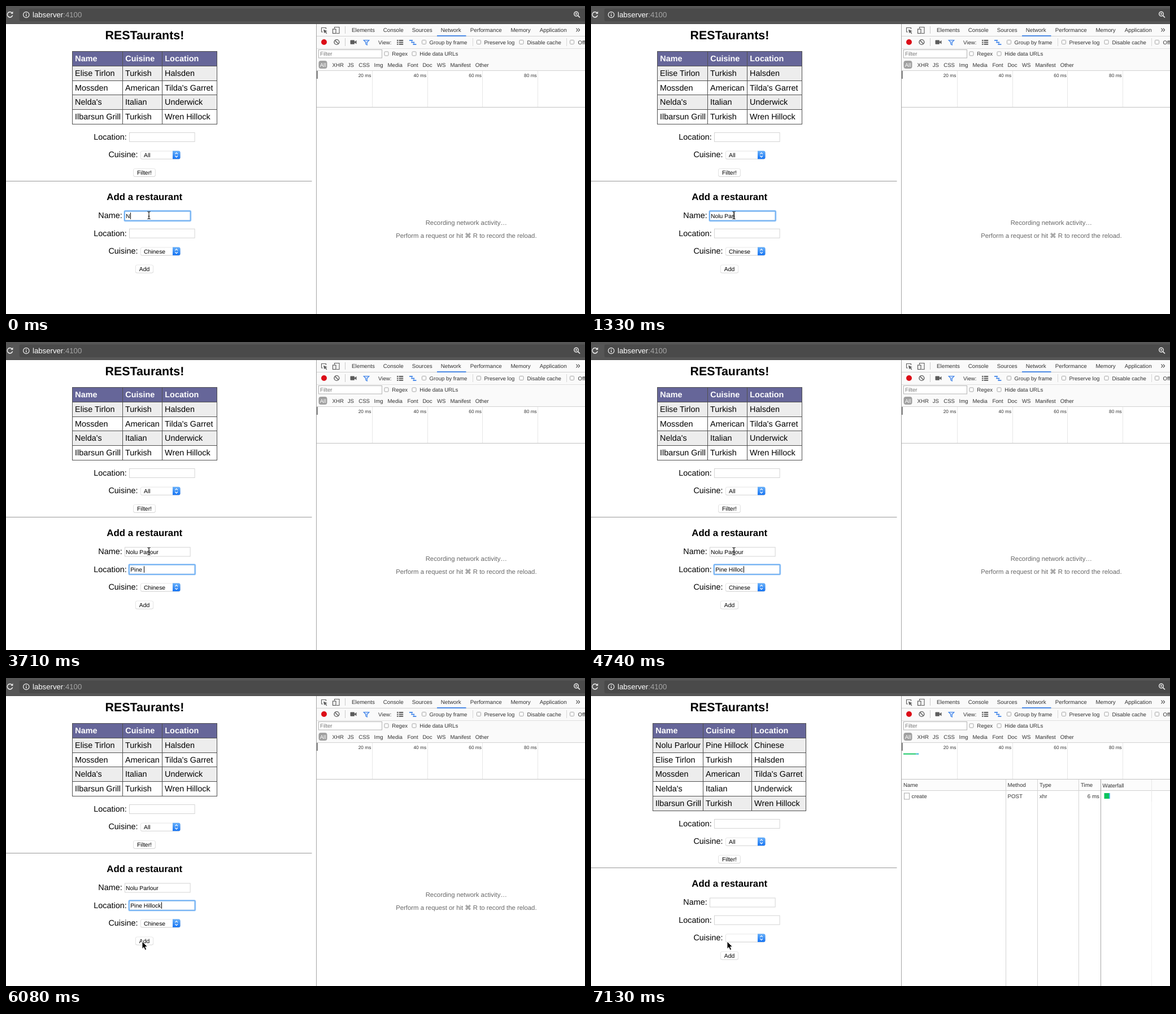
These frames come from a looping animation (1025 by 546 pixels, 8000 ms). An HTML page:

```html
<!DOCTYPE html>
<html lang="en">
<head>
<meta charset="utf-8">
<title>Restaurant form</title>
<style>
  html, body { margin: 0; width: 100%; height: 100%; overflow: hidden; background: #fff; }
  svg { display: block; width: 100vw; height: 100vh; }
  text { font-family: "Liberation Sans", Arial, "DejaVu Sans", sans-serif; white-space: pre; text-rendering: geometricPrecision; }
</style>
</head>
<body>
<svg id="stage" viewBox="0 0 1025 546" xmlns="http://www.w3.org/2000/svg"></svg>
<script>
const LOOP = 8000;
const SENT = 7130;
const BLUR = 6980;
const TAB = 2220;
const NAME = "Nolu Parlour";
const PLACE = "Pine Hillock";

// Time at which each character appears.
const nameKeys = [0, 300, 450, 600, 740, 890, 1180, 1330, 1480, 1480, 1620, 1920];
const placeKeys = [2970, 3270, 3410, 3410, 3710, 4000, 4150, 4300, 4450, 4590, 4740, 4890];
const caretOff = [[2670, 2970], [5480, 5930], [6380, 6830]];

// Pointer: time, x, y.
const path = [
  [0, 253, 371], [5190, 255, 388], [5340, 259, 430], [5480, 260, 453], [5630, 258, 459],
  [5780, 251, 463], [5930, 244, 466], [6080, 241, 467]
];

const text = (x, y, size, str, opt = "") => `<text x="${x}" y="${y}" font-size="${size}" ${opt}>${str}</text>`;
const rect = (x, y, w, h, fill, opt = "") => `<rect x="${x}" y="${y}" width="${w}" height="${h}" fill="${fill}" ${opt}/>`;
const line = (x1, y1, x2, y2, color, w = 1) =>
  `<line x1="${x1}" y1="${y1}" x2="${x2}" y2="${y2}" stroke="${color}" stroke-width="${w}"/>`;
const draw = (d, color, w = 1.2, fill = "none") => `<path d="${d}" stroke="${color}" stroke-width="${w}" fill="${fill}"/>`;
const group = (id, body) => `<g id="${id}">${body}</g>`;
const MID = 'text-anchor="middle"';
const BOLD = 'font-weight="bold"';

function addressBar() {
  return rect(0, 0, 1025, 32, "#565656")
    + rect(23.5, 4.5, 1010, 22.5, "#4a4a4a", 'rx="3"')
    + line(0, 31.5, 1025, 31.5, "#474747")
    + draw("M10.6 12.2A4.7 4.7 0 1 0 11.6 16.4", "#f0f0f0", 1.5)
    + draw("M12.4 9.6V13.8H8.2Z", "none", 0, "#f0f0f0")
    + `<circle cx="35.8" cy="15.5" r="5.2" fill="none" stroke="#f0f0f0" stroke-width="1.2"/>`
    + rect(35.1, 14.8, 1.4, 3.6, "#f0f0f0") + rect(35.1, 12.3, 1.4, 1.4, "#f0f0f0")
    + text(47, 20, 13.2, 'labserver<tspan fill="#a6a6a6">:4100</tspan>', 'fill="#fff"')
    + `<circle cx="1009.5" cy="14" r="3.8" fill="none" stroke="#eee" stroke-width="1.4"/>`
    + draw("M1012.3 16.8L1016 20.5", "#eee", 1.7)
    + draw("M1007.6 14H1011.4M1009.5 12.1V15.9", "#eee", 1);
}

function table(id, cols, rows) {
  const left = cols[0], width = cols[3] - left;
  const edge = r => Math.floor(80.5 + 25.8 * r) + 0.5;
  const bottom = edge(rows.length + 1);
  let out = rect(left, edge(0), width, 26, "#666699");
  ["Name", "Cuisine", "Location"].forEach((s, i) => {
    out += text(cols[i] + 4.8, 98, 14.4, s, BOLD + ' fill="#fff"');
  });
  rows.forEach((row, i) => {
    const y = edge(i + 1);
    out += rect(left, y, width, edge(i + 2) - y, i % 2 ? "#fff" : "#ededed");
    row.forEach((s, c) => { out += text(cols[c] + 4.6, y + 17.4, 14.4, s); });
  });
  for (let r = 0; r <= rows.length + 1; r++) {
    out += line(left - 0.5, edge(r), cols[3] + 0.5, edge(r), "#505050");
  }
  cols.forEach(x => { out += line(x, edge(0), x, bottom, "#505050"); });
  return group(id, out);
}

const field = (x, y) => rect(x + 0.5, y + 0.5, 115.6, 16, "#fff", 'stroke="#d4d4d4"');

const ring = (id, x, y) => group(id,
  rect(x - 0.4, y - 0.3, 117.4, 17.8, "none", 'rx="1.8" stroke="#a9d0fb" stroke-width="2.8" opacity=".75"')
  + rect(x, y, 116.6, 17.2, "none", 'rx="1" stroke="#6fb0f3" stroke-width="1.8"'));

const control = (x, y, w) => rect(x, y + 0.8, w, 14.2, "#c8c8c8", 'rx="3"')
  + rect(x + 0.4, y + 0.4, w - 0.8, 13.9, "#fff", 'rx="2.8" stroke="#e4e4e4" stroke-width=".8"');

function select(y, label, id) {
  return control(238, y, 70.5)
    + `<path d="M295 ${y}H305.5Q308.5 ${y} 308.5 ${y + 3}V${y + 11.5}Q308.5 ${y + 14.5} 305.5 ${y + 14.5}H295Z" fill="url(#blue)"/>`
    + draw(`M299.4 ${y + 5.8}L301.7 ${y + 3.3}L304 ${y + 5.8}M299.4 ${y + 8.7}L301.7 ${y + 11.2}L304 ${y + 8.7}`, "#fff", 1.2)
    + text(244, y + 11.2, 10.4, label, `id="${id}"`);
}

const button = (x, y, w, label) => control(x, y, w) + text(x + w / 2, y + 11.2, 10.4, label, MID);

function forms() {
  return text(155.3, 237, 14.4, "Location:") + field(218, 224)
    + text(181.4, 268, 14.4, "Cuisine:") + select(256.8, "All", "anyKind")
    + button(225.3, 287.8, 39.4, "Filter!")
    + line(0, 310.5, 541.5, 310.5, "#989898")
    + text(245.2, 344, 16.85, "Add a restaurant", BOLD + " " + MID)
    + text(163.3, 376.4, 14.4, "Name:") + field(210, 363.5) + ring("nameRing", 210, 363.5)
    + text(212, 376, 10.4, "", 'id="nameText"')
    + text(155.3, 407.6, 14.4, "Location:") + field(218, 394.7) + ring("placeRing", 218, 394.7)
    + text(220.2, 407.3, 10.4, "", 'id="placeText"')
    + text(181.4, 438.8, 14.4, "Cuisine:") + select(427.5, "Chinese", "kind")
    + button(229, 458.6, 32, "Add")
    + rect(0, 0, 1, 11.5, "#000", 'id="caret"');
}

const check = (x, y) => rect(x + 0.5, y + 0.5, 7, 7, "#fdfdfd", 'rx="1.2" stroke="#a4a4a4"');

function devtools() {
  const ink = "#333", icon = "#5c5c5c", blue = "#4285e8", bar = "#fafafa";
  const labels = (items, y, size) => items.map(([x, s]) => text(x, y, size, s, `fill="${ink}"`)).join("");
  let out = rect(549, 32, 476, 514, "#fff") + rect(550, 32, 475, 82, bar)
    + line(550, 53.5, 1025, 53.5, "#d2d2d2") + line(550, 75.5, 1025, 75.5, "#e0e0e0")
    + line(550, 114.5, 1025, 114.5, "#d2d2d2");

  // Tabs
  out += draw("M566.5 41V38.5H558.5V46H561", icon, 1.1)
    + draw("M562 41.5L568.8 44.6L566 45.5L568.4 48.2L567.2 49.2L564.8 46.5L563.4 48.6Z", "none", 0, icon)
    + draw("M581.5 40V37.5H590V48.5H585", icon, 1.1)
    + rect(578.5, 41, 5.5, 7.5, bar, `stroke="${icon}" stroke-width="1.2"`)
    + line(600.5, 36, 600.5, 49, "#cacaca")
    + labels([[612, "Elements"], [667.7, "Console"], [718.7, "Sources"], [769.7, "Network"], [821.7, "Performance"],
      [893.4, "Memory"], [944.7, "Application"]], 45.6, 9.8)
    + draw("M1009.5 39.5L1012 42.5L1009.5 45.5M1013 39.5L1015.5 42.5L1013 45.5", ink, 1.1)
    + rect(763, 52, 51.5, 1.8, "#3e82e6");

  // Recording controls
  out += `<circle cx="563" cy="64" r="5" fill="#dc0d17"/>`
    + `<circle cx="585.4" cy="64" r="4.4" fill="none" stroke="${icon}" stroke-width="1.4"/>`
    + draw("M582.4 61L588.4 67", icon, 1.4)
    + line(600.5, 57, 600.5, 71, "#cacaca")
    + rect(609.5, 60.5, 7.5, 7.2, icon, 'rx="1"') + draw("M617 63.5L620.5 60.8V67.4L617 64.7Z", "none", 0, icon)
    + draw("M633.2 60.5H642.8L639.2 64.5V69.2L636.8 67.5V64.5Z", blue, 1.2, "#cfe0fa")
    + labels([[659, "View:"], [749.6, "Group by frame"], [846.4, "Preserve log"], [922.4, "Disable cache"],
      [1012.6, "Offline"]], 67.5, 9.65);
  for (let i = 0; i < 3; i++) {
    out += rect(692, 60 + i * 3.4, 2.4, 2, icon) + rect(695.6, 60 + i * 3.4, 7.6, 2, icon)
      + rect(714 + i * 3.2, 60 + i * 3.6, 6, 1.8, blue);
  }
  out += draw("M718.5 61V64.5M722 64.5V68", blue, 0.9)
    + line(826.5, 57, 826.5, 71, "#d8d8d8") + line(992.5, 57, 992.5, 71, "#d8d8d8")
    + [736, 833, 908.5, 998].map(x => check(x, 60)).join("");

  // Filters
  out += rect(553.5, 77.5, 112, 14.5, "#fff", 'stroke="#b4b4b4"')
    + text(556, 88, 9.7, "Filter", 'fill="#777"')
    + check(669.5, 80.5) + check(718.5, 80.5)
    + labels([[683.3, "Regex"], [732.3, "Hide data URLs"]], 88.2, 9.65)
    + rect(553.5, 97, 15, 14, "#a0a0a0", 'rx="4"') + text(561, 107.6, 9.6, "All", MID + ' fill="#fff"')
    + labels([[577.6, "XHR"], [604.8, "JS"], [624.2, "CSS"], [651.5, "Img"], [675.6, "Media"], [710.4, "Font"],
      [737.4, "Doc"], [763, "WS"], [786.4, "Manifest"], [830.7, "Other"]], 107.7, 9.65);

  // Timeline
  for (let i = 1; i < 6; i++) {
    const x = 550.5 + i * 97.8;
    out += line(Math.floor(x) + 0.5, 115, Math.floor(x) + 0.5, 179, "#e7e7e7")
      + text(i < 5 ? x - 2 : x + 1.4, 125.8, 8.3, i * 20 + " ms", `text-anchor="${i < 5 ? "end" : "middle"}" fill="${ink}"`);
  }
  return out + rect(550, 115, 1.8, 14, "#777") + line(550, 179.5, 1025, 179.5, "#c2c2c2")
    + line(549.5, 32, 549.5, 546, "#a5a5a5");
}

function emptyLog() {
  const opt = MID + ' fill="#686868"';
  return group("empty", text(814.7, 388.4, 11.38, "Recording network activity…", opt)
    + text(814.9, 410.8, 11.34, "Perform a request or hit ⌘ R to record the reload.", opt));
}

function requestLog() {
  const cells = [[553, "Name", "create"], [737.6, "Method", "POST"], [794, "Type", "xhr"], [867, "Time", ""], [905.6, "Waterfall", ""]];
  let out = rect(550, 180, 475, 19, "#fcfcfc") + line(550, 199.5, 1025, 199.5, "#d0d0d0")
    + line(992.5, 180, 992.5, 219, "#e8e8e8") + line(992.5, 219, 992.5, 546, "#f0f0f0");
  [734.5, 790.5, 863.5].forEach(x => { out += line(x, 180, x, 546, "#d4d4d4"); });
  out += line(902.5, 180, 902.5, 546, "#a6a6a6");
  cells.forEach(([x, head, cell], i) => {
    out += text(x, i === 4 ? 193.7 : 193.2, 9.7, head, 'fill="#333"')
      + text(i ? x : 567.6, 212.7, 9.7, cell, 'fill="#333"');
  });
  return group("log", out + text(899.8, 212.7, 9.7, "6 ms", 'text-anchor="end" fill="#333"')
    + rect(554.5, 204, 9, 11, "#fff", 'stroke="#a8a8a8"')
    + rect(908.5, 204, 9, 10, "#0cc45c") + rect(917.3, 204, 1.4, 10, "#29a5e8")
    + rect(553, 133.6, 22.5, 2, "#17c765") + rect(575.5, 133.6, 4.8, 2, "#2fb4d6"));
}

const pointers = group("beam", draw("M-2.6 -6.5Q0 -6.5 0 -4.8Q0 -6.5 2.6 -6.5M0 -5V5M-2.6 6.5Q0 6.5 0 4.8Q0 6.5 2.6 6.5M-1.4 1.6H1.4", "#111", 1.1))
  + group("arrow", draw("M0 0V13.2L3 10.5L5.2 15.4L7.7 14.3L5.6 9.6H9.7Z", "#fff", 1, "#000"));

const spots = [
  ["Elise Tirlon", "Turkish", "Halsden"],
  ["Mossden", "American", "Tilda's Garret"],
  ["Nelda's", "Italian", "Underwick"],
  ["Ilbarsun Grill", "Turkish", "Wren Hillock"]
];

document.getElementById("stage").innerHTML =
  `<defs><linearGradient id="blue" x1="0" y1="0" x2="0" y2="1"><stop offset="0" stop-color="#69b1fa"/><stop offset="1" stop-color="#1674f3"/></linearGradient></defs>`
  + rect(0, 0, 1025, 546, "#fff")
  + text(245.4, 58.8, 21.4, "RESTaurants!", BOLD + " " + MID)
  + table("before", [117.5, 206.5, 276.5, 373.5], spots)
  + table("after", [109.5, 198.5, 284.5, 380.5], [[NAME, PLACE, "Chinese"], ...spots])
  + group("forms", forms())
  + devtools() + emptyLog() + requestLog() + addressBar() + pointers;

const el = id => document.getElementById(id);
const show = (id, on) => el(id).setAttribute("visibility", on ? "visible" : "hidden");
const typed = (str, keys, t) => str.slice(0, keys.filter(k => k <= t).length);

function render(t) {
  const sent = t >= SENT;
  show("before", !sent);
  show("after", sent);
  show("empty", !sent);
  show("log", sent);
  show("kind", !sent);
  el("forms").setAttribute("transform", `translate(0 ${sent ? 26 : 0})`);

  el("nameText").textContent = sent ? "" : typed(NAME, nameKeys, t);
  el("placeText").textContent = sent ? "" : typed(PLACE, placeKeys, t);
  const onName = t < TAB, focused = t < BLUR;
  show("nameRing", onName);
  show("placeRing", !onName && focused);

  const box = el(onName ? "nameText" : "placeText");
  const end = +box.getAttribute("x") + (box.textContent ? box.getComputedTextLength() : 0);
  el("caret").setAttribute("x", Math.round(end + 0.5));
  el("caret").setAttribute("y", onName ? 366.3 : 397.4);
  show("caret", focused && !caretOff.some(([a, b]) => t >= a && t < b));

  const [start, x, y] = path.filter(p => p[0] <= t).pop();
  show("beam", start === 0);
  show("arrow", start > 0);
  el(start ? "arrow" : "beam").setAttribute("transform", `translate(${x} ${y})`);
}

function tick(now) {
  render(now % LOOP);
  requestAnimationFrame(tick);
}
render(0);
requestAnimationFrame(tick);
</script>
</body>
</html>
```
